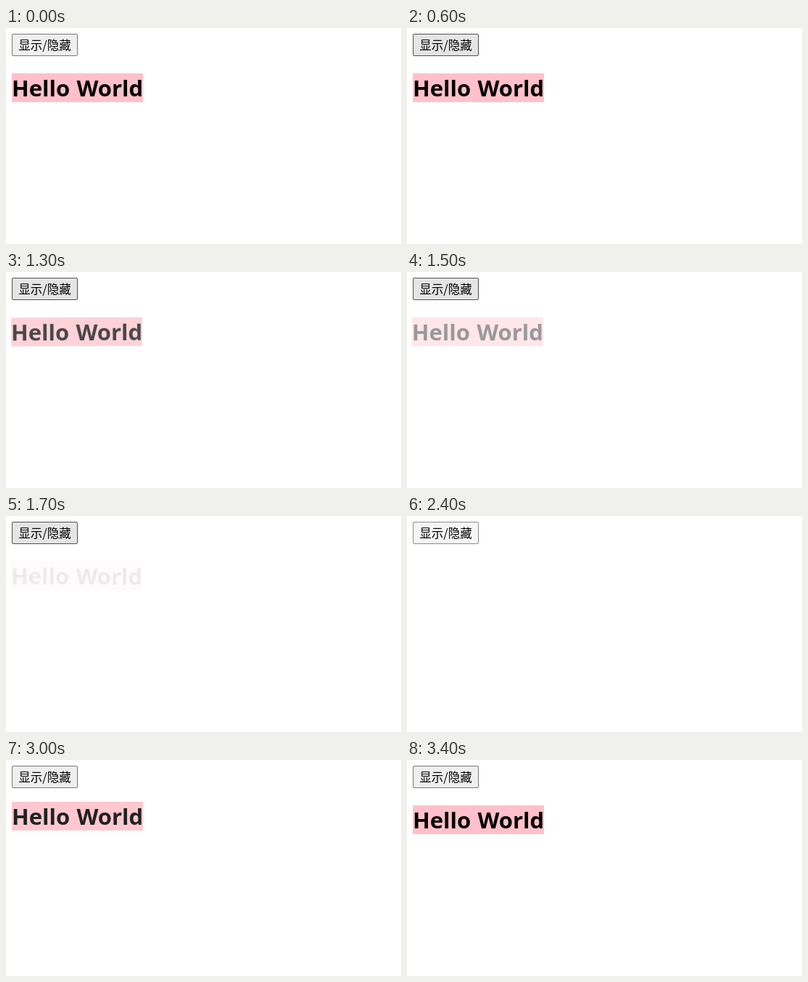
An HTML page for the animation above (4000 ms loop, 545x300 px).

```html
<!DOCTYPE html>
<html lang="zh">
<head>
<meta charset="utf-8">
<title>显示/隐藏</title>
<style>
  html, body { margin: 0; width: 100%; height: 100%; overflow: hidden; background: #fff; }
  svg { display: block; }
  #label { font: 16.5px "Noto Sans CJK SC", "Noto Sans CJK", sans-serif; text-anchor: middle; }
  #title { transform-origin: 98.5px 83px; }
  #title text { font: bold 31px "Open Sans", "Noto Sans", sans-serif; word-spacing: 1.2px; }
</style>
</head>
<body>
<svg width="545" height="300" viewBox="0 0 545 300">
  <rect id="button" x="8.5" y="8.5" width="90" height="30" rx="1.5"/>
  <text id="label" x="53.5" y="30">显示/隐藏</text>
  <g id="title">
    <rect x="8" y="63" width="181" height="40" fill="#ffc0cb"/>
    <text x="8" y="95">Hello World</text>
  </g>
</svg>
<script>
const LOOP = 4000, STEP = 100;
const button = document.getElementById('button');
const title = document.getElementById('title');

const looks = {
  normal: ['#efefef', '#767676'],
  hover: ['#e5e5e5', '#4f4f4f'],
  active: ['#f5f5f5', '#8d8d8d']
};
const buttonStates = [
  [0, 'normal'], [600, 'hover'], [800, 'active'], [900, 'hover'],
  [2400, 'active'], [2500, 'hover'], [2900, 'normal']
];

// time, x shift, rotation in degrees
const shake = [
  [0, 0, 0], [900, 1, 0.4], [1000, -1, -0.4], [1100, 1.4, 0.2],
  [1200, -1, 0.3], [1300, -1, -0.2], [1400, 1, 0.5],
  [1500, -1.2, 0], [1600, 1, -0.5], [1700, -1, 0.3]
];
const move = (x, y, turn) => `translate(${x}px, ${y}px) rotate(${turn}deg)`;
const key = (time, style, easing = 'linear') => ({ offset: time / LOOP, easing, ...style });

const fadeIn = [2525, 3340];
const tracks = [
  [
    ...shake.map(([t, x, turn]) => key(t, { transform: move(x, 0, turn) }, 'step-end')),
    key(fadeIn[0], { transform: move(0, -40, 0) }, 'ease'),
    key(fadeIn[1], { transform: move(0, 0, 0) }),
    key(LOOP, { transform: move(0, 0, 0) })
  ],
  [
    key(0, { opacity: 1 }),
    key(1125, { opacity: 1 }),
    key(1750, { opacity: 0 }),
    key(fadeIn[0], { opacity: 0 }, 'ease'),
    key(fadeIn[1], { opacity: 1 }),
    key(LOOP, { opacity: 1 })
  ]
].map(frames => {
  const track = title.animate(frames, { duration: LOOP, fill: 'both' });
  track.pause();
  return track;
});

function draw(time) {
  for (const track of tracks) track.currentTime = time;
  const state = buttonStates.filter(([start]) => start <= time).pop()[1];
  const [fill, stroke] = looks[state];
  button.setAttribute('fill', fill);
  button.setAttribute('stroke', stroke);
}

const start = performance.now();
function tick() {
  const time = (performance.now() - start) % LOOP;
  draw(Math.floor(time / STEP) * STEP);
  requestAnimationFrame(tick);
}
draw(0);
requestAnimationFrame(tick);
</script>
</body>
</html>
```
